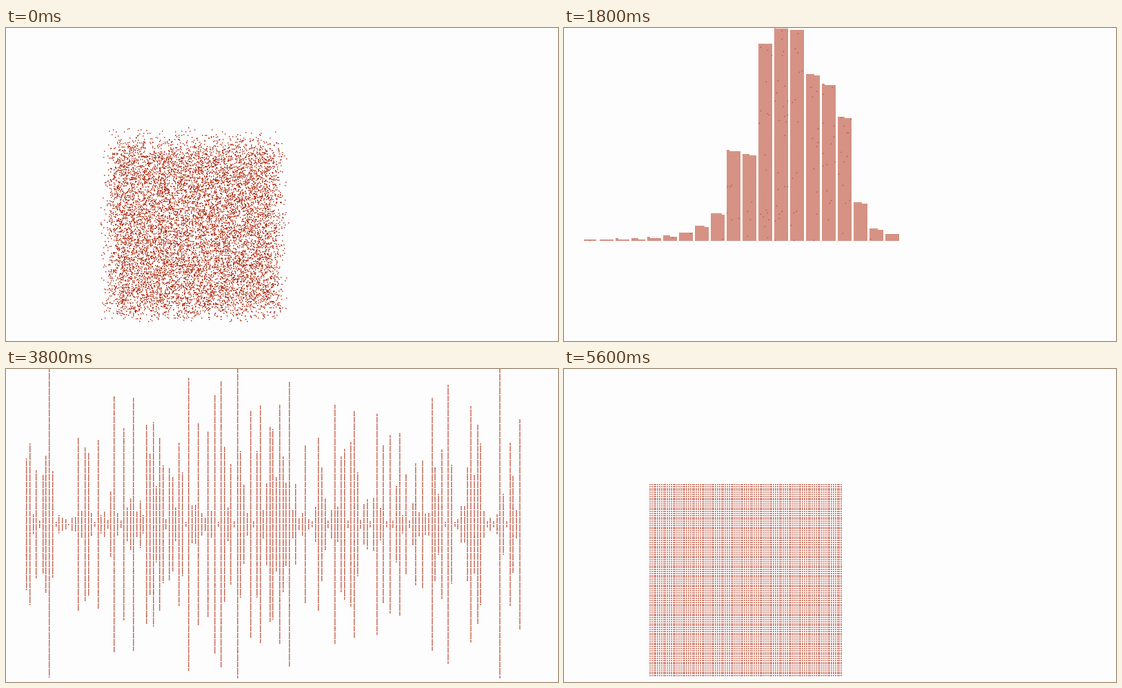
An HTML page with a canvas that plays this animation: 800 px wide and 454 px high, repeating every 5.7 s.

```html
<!DOCTYPE html>
<html lang="en">
<head>
<meta charset="utf-8">
<title>Particle layouts</title>
<style>
  html, body { margin: 0; width: 100%; height: 100%; overflow: hidden; background: #fdfdfe; }
  canvas { display: block; }
</style>
</head>
<body>
<canvas id="stage" width="800" height="454"></canvas>
<script>
const LOOP = 5700;
const COUNT = 10000;
const DOT = 1.4;
const ctx = document.getElementById('stage').getContext('2d');

function seeded(seed) {
  return () => {
    seed = (seed + 0x6D2B79F5) | 0;
    let v = Math.imul(seed ^ (seed >>> 15), 1 | seed);
    v = (v + Math.imul(v ^ (v >>> 7), 61 | v)) ^ v;
    return ((v ^ (v >>> 14)) >>> 0) / 4294967296;
  };
}

function shuffle(list, random) {
  for (let i = list.length - 1; i > 0; i--) {
    const j = Math.floor(random() * (i + 1));
    [list[i], list[j]] = [list[j], list[i]];
  }
  return list;
}

function squareLayout() {
  return Array.from({ length: COUNT }, (_, i) =>
    [124 + (i % 100) * 2.8, 167 + Math.floor(i / 100) * 2.8]);
}

// Bars ten dots wide; the tail bars grow exponentially up to the body.
function histogramLayout() {
  const body = [65.2, 62.5, 143, 154.1, 153, 120.6, 113.2, 89.5, 27.6, 8.6, 5];
  const tail = Array.from({ length: 9 }, (_, i) => 0.8 + 19 * Math.exp((i - 8) * 0.65));
  const points = [];
  [...tail, ...body].forEach((rows, bar) => {
    for (let i = 0; i < Math.round(rows * 10); i++) {
      points.push([28.5 + bar * 23 + (i % 10) * 2, 307 - Math.floor(i / 10) * 2]);
    }
  });
  return shuffle(points, seeded(11));
}

// Mirrored columns of skewed random height, with a few outliers.
function columnsLayout() {
  const random = seeded(5);
  const outliers = { 7: 460, 50: 213, 60: 209, 65: 290, 81: 207, 130: 203, 146: 270 };
  const heights = Array.from({ length: 153 }, (_, i) => {
    const envelope = 1 - 0.9 * Math.exp(-(((i - 11.5) / 4) ** 4));
    const height = (4 + 185 * random() ** 1.9) * envelope;
    return outliers[i] || height;
  });
  const pitch = 2 * heights.reduce((a, b) => a + b) / COUNT;
  const points = [];
  heights.forEach((height, column) => {
    const size = Math.max(1, Math.floor(2 * height / pitch));
    for (let i = 0; i < size; i++) {
      points.push([29.2 + column * 4.7, 224.5 + (i - (size - 1) / 2) * pitch]);
    }
  });
  return shuffle(points, random);
}

const square = squareLayout();
const histogram = histogramLayout();
const columns = columnsLayout();

// Each move decays exponentially; skip is time already spent when it appears.
const moves = [
  { at: -43, from: square, to: histogram, decay: 285, skip: 0 },
  { at: 2070, from: histogram, to: columns, decay: 230, skip: 0 },
  { at: 4230, from: columns, to: square, decay: 390, skip: 375 },
  { at: LOOP - 43, from: square, to: histogram, decay: 285, skip: 0 }
];

function draw(time) {
  const { at, from, to, decay, skip } = moves.filter(m => m.at <= time).pop();
  let rest = Math.exp(-(time - at + skip) / decay);
  if (rest < 0.013) rest = 0;
  const mix = (a, b) => Math.round(b + (a - b) * rest);

  ctx.fillStyle = '#fdfdfe';
  ctx.fillRect(0, 0, 800, 454);
  ctx.fillStyle = '#ac2406';
  for (let i = 0; i < COUNT; i++) {
    const a = from[i % from.length];
    const b = to[i % to.length];
    const y = mix(a[1], b[1]);
    if (y < 448) ctx.fillRect(mix(a[0], b[0]), y, DOT, DOT);
  }
}

const start = performance.now();
function tick() {
  draw((performance.now() - start) % LOOP);
  requestAnimationFrame(tick);
}
tick();
</script>
</body>
</html>
```
